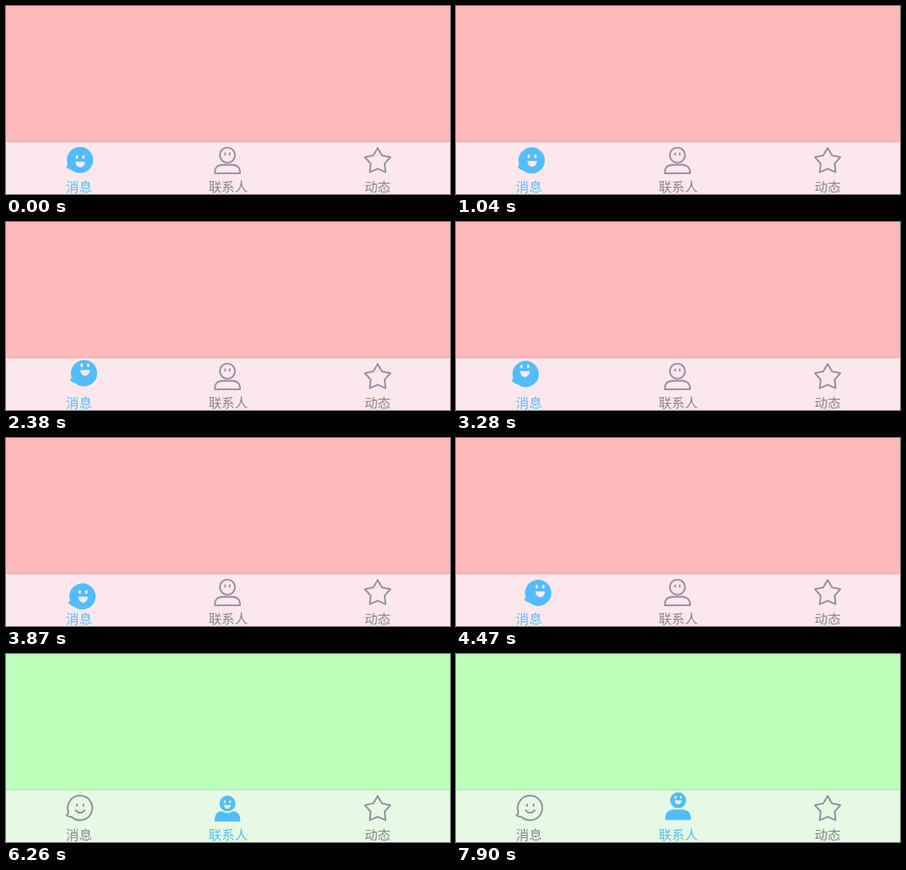
Animation of 556 by 236 pixels, one loop 8000 ms. Source, as an HTML page:

```html
<!DOCTYPE html>
<html lang="zh">
<head>
<meta charset="utf-8">
<style>
html, body { margin: 0; width: 100%; height: 100%; overflow: hidden; }
svg { display: block; width: 556px; height: 236px; --page: #ffb9bb; --bar: #fce8ec; --rule: #e2b3ba; background: var(--page); }
svg.second { --page: #bbffba; --bar: #e6f9e5; --rule: #aeddb0; }
.bar { fill: var(--bar); }
.rule { fill: var(--rule); }
text { font: 16.4px "Noto Sans CJK SC", "Noto Sans CJK", sans-serif; font-weight: 350; text-anchor: middle; fill: #87858c; }
.line { fill: none; stroke: #9490a0; stroke-width: 2.1; stroke-linecap: round; stroke-linejoin: round; }
.solid { fill: #51bdfd; }
.face { fill: var(--bar); }
svg:not(.second) .chat text, .second .people text { fill: #51bdfd; }
svg:not(.second) .chat .line, svg:not(.second) .people .solid,
.second .chat .solid, .second .people .line { display: none; }
</style>
</head>
<body>
<svg id="stage" viewBox="0 0 556 236">
  <rect class="bar" y="170" width="556" height="66"/>
  <rect class="rule" y="170" width="556" height="1"/>

  <g class="chat">
    <g class="line">
      <path d="M78.2 198.5A15.4 15.4 0 1 1 82.3 204.6Q79 204.6 75.8 202.3Q78 201.4 78.2 198.5Z"/>
      <path d="M89 188.9v1.8M97 188.9v1.8M87.3 196.2Q92.8 202.4 98.5 196.2"/>
    </g>
    <g class="solid">
      <path id="bubble" d="M77 198.2A16.5 16.5 0 1 1 82.2 206Q77.6 205.2 74.8 201.6Q76.7 201 77 198.2Z"/>
      <g id="smile" class="face">
        <ellipse cx="88.7" cy="189.4" rx="1.6" ry="2.5"/>
        <ellipse cx="97" cy="189.4" rx="1.6" ry="2.5"/>
        <path d="M87 195.4H99A6 7.3 0 0 1 87 195.4Z"/>
      </g>
    </g>
    <text x="91.5" y="232.6">消息</text>
  </g>

  <g class="people">
    <g class="line">
      <circle cx="277.3" cy="187.3" r="9.5"/>
      <path d="M274.4 184.9v1.8M280.2 184.9v1.8"/>
      <path d="M261.5 210Q260.8 199.6 272 199.4H282.5Q293.8 199.6 293 210Z"/>
    </g>
    <g class="solid">
      <path id="torso" d="M261.2 209Q261 197.4 272 197H282.5Q293.6 197.4 293.4 209Q293.3 210.2 292 210.2H262.6Q261.3 210.2 261.2 209Z"/>
      <circle id="head" cx="277.3" cy="187.8" r="10.8" stroke="var(--bar)" stroke-width="1.6"/>
      <g id="grin" class="face">
        <ellipse cx="274" cy="185.4" rx="1.2" ry="1.9"/>
        <ellipse cx="280.7" cy="185.4" rx="1.2" ry="1.9"/>
        <path d="M273 189.4H281.6A4.3 5 0 0 1 273 189.4Z"/>
      </g>
    </g>
    <text x="278.3" y="232.6">联系人</text>
  </g>

  <g>
    <path id="star" class="line"/>
    <text x="465.3" y="232.6">动态</text>
  </g>
</svg>
<script>
const $ = id => document.getElementById(id);
const move = (id, x, y) => $(id).setAttribute("transform", `translate(${x} ${y})`);

const points = Array.from({ length: 10 }, (_, i) => {
  const a = i * Math.PI / 5, r = i % 2 ? 9.2 : 16.8;
  return `${465.4 + r * Math.sin(a)} ${195 - r * Math.cos(a)}`;
});
$("star").setAttribute("d", `M${points.join("L")}Z`);

// Drag path of the bubble: step, x, y
const drag = [
  [-1, 0, 0], [1, 4, 1], [3, 9, 4], [5, 10.5, 1.8], [7, 9, -3], [10, 3, -3.8], [14, -5, -3.4],
  [16, -5.5, -2.5], [18, -4, 2], [20, 3, 5.5], [22, 11, 5], [23, 12.5, 3.5], [24, 10.2, 1],
  [26, 8, -2.6], [28, 3, -2], [30, 0, 0]
];

function dragAt(step) {
  const i = Math.max(1, drag.findIndex(p => p[0] >= step));
  const a = drag[i - 1], b = drag[i], u = (step - a[0]) / (b[0] - a[0]);
  return [a[1] + (b[1] - a[1]) * u, a[2] + (b[2] - a[2]) * u];
}

function draw(t) {
  $("stage").classList.toggle("second", t >= 6260);

  // Motion is held on steps of about 149 ms
  const step = Math.min(30, Math.max(-1, Math.floor((t - 895) / 148.67)));
  const [x, y] = dragAt(step);
  const press = Math.min(1, (step + 1) / 3, (30 - step) / 3);
  move("bubble", x, y);
  move("smile", x * 1.22, y + press * (0.5 * y - 4.3));

  const lift = t < 7600 ? 0 : Math.min(3, 1 + Math.floor((t - 7600) / 150)) / 3;
  move("torso", lift * 0.8, lift * -1.8);
  move("head", lift * 0.9, lift * -4.2);
  move("grin", lift, lift * -5.6);
}

function tick() {
  draw(performance.now() % 8000);
  requestAnimationFrame(tick);
}
tick();
</script>
</body>
</html>
```
